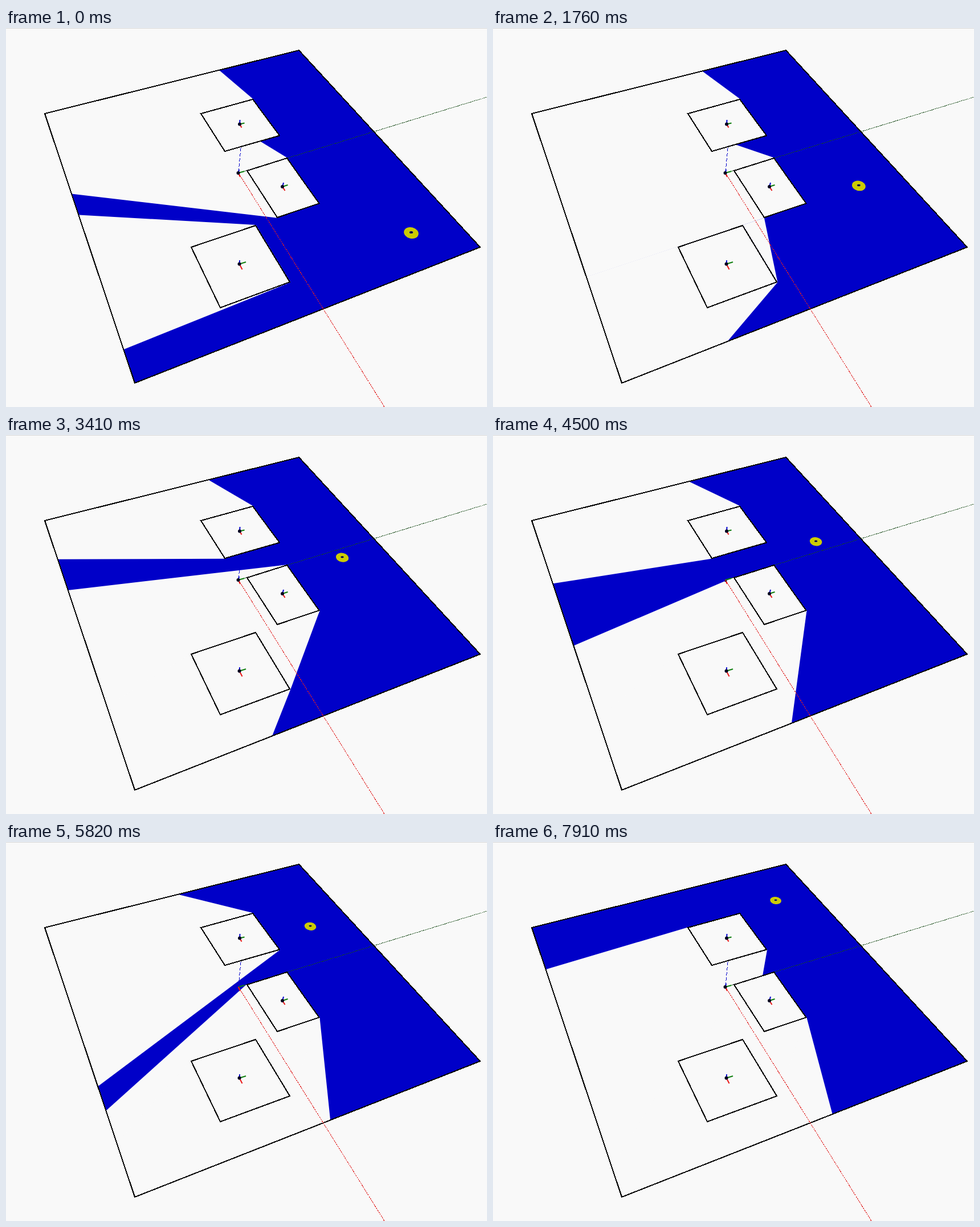
Recreate the animation shown at these times as an HTML page. Size 844 by 664 pixels, loop 8 s.

```html
<!DOCTYPE html>
<html lang="en">
<head>
<meta charset="utf-8">
<title>Visibility region of a moving light</title>
<style>
  html, body { margin: 0; width: 100%; height: 100%; overflow: hidden; background: #f9f9f9; }
  svg { display: block; width: 844px; height: 664px; }
  .edge { stroke: #000; stroke-width: 2; }
  .edge, .axis { shape-rendering: crispEdges; }
  .paper { fill: #f9f9f9; }
</style>
</head>
<body>
<svg viewBox="0 0 844 664">
  <defs>
    <clipPath id="floorClip"><polygon class="floor"/></clipPath>
    <clipPath id="shadeClip"></clipPath>
  </defs>
  <rect width="844" height="1" fill="#d8d8d8"/>
  <polygon class="floor" fill="#0000c8"/>
  <g id="shade" class="paper" clip-path="url(#floorClip)"></g>
  <polygon class="floor edge" fill="none"/>
  <g fill="none">
    <path class="axis" d="M408 254L844 121" stroke="#184a18" stroke-dasharray="2 1"/>
    <path class="axis" d="M408 254L664 664" stroke="#e02020" stroke-dasharray="3 1"/>
    <path class="axis" d="M408 252L412.5 206" stroke="#0000c8" stroke-dasharray="6 3"/>
  </g>
  <g id="boxes"></g>
  <g id="gizmos"></g>
  <g id="lamp">
    <ellipse rx="13" ry="9.8" fill="#cccc00" transform="rotate(14)"/>
    <ellipse cy="-1" rx="3.2" ry="2" fill="#0000c8"/>
    <ellipse cy="-1" rx="2.6" ry="1.5" fill="#000018"/>
  </g>
</svg>
<script>
const LOOP = 8000, TICK = 110;
const floor = [[68, 150], [514, 39], [832, 384], [226, 622]];
const boxes = [
  [[342, 150], [433, 125], [480, 188.5], [384, 216]],
  [[423, 250], [493, 228], [549.5, 307.3], [476, 332]],
  [[325, 384], [438, 346], [498, 445], [376, 490]]
];
// Key points of the lamp's path: time, x
const path = [
  [220, 711], [440, 688], [1760, 641.8], [2200, 621], [3410, 590], [4290, 570.5],
  [4400, 570.5], [5060, 547], [5830, 534], [6930, 508.5], [7920, 496]
];

const $ = id => document.getElementById(id);
const points = list => list.map(p => p.join()).join(' ');

function add(parent, tag, attrs = {}) {
  const el = document.createElementNS('http://www.w3.org/2000/svg', tag);
  for (const key in attrs) el.setAttribute(key, attrs[key]);
  return parent.appendChild(el);
}

function gizmo(x, y, up, right, down) {
  const g = add($('gizmos'), 'g', { transform: `translate(${x} ${y})`, 'stroke-width': 2 });
  add(g, 'path', { d: `M0 0L${right}`, stroke: '#108010' });
  add(g, 'path', { d: `M0 0L${down}`, stroke: '#e81818' });
  const ball = add(g, 'g');
  add(ball, 'path', { d: `M0 0L${up}`, stroke: '#0000d0' });
  add(ball, 'circle', { r: 3, fill: '#000020' });
  return ball;
}

// Obstacles cast shadows from slightly outside their outline
function grow(box) {
  const mid = [0, 1].map(i => box.reduce((sum, p) => sum + p[i], 0) / box.length);
  return box.map(p => p.map((v, i) => mid[i] + (v - mid[i]) * 1.015));
}

const casters = boxes.map(grow);
const front = casters[2];

document.querySelectorAll('.floor').forEach(el => el.setAttribute('points', points(floor)));
boxes.forEach(b => add($('boxes'), 'polygon', { class: 'paper edge', points: points(b) }));
gizmo(410, 168.5, '0.5 -7.5', '8.5 -2', '3.5 6');
gizmo(485, 278, '2 -7', '9.5 -3', '4.5 7');
gizmo(409.5, 413.5, '0.5 -6.5', '11.5 -3.5', '5 9.5');
// The ball at the origin disappears beneath the lit region
gizmo(407.5, 254, '1.5 -6', '11 -3', '3.5 7').setAttribute('clip-path', 'url(#shadeClip)');

// One shadow per box and one for the gap between two of them
const layers = [...boxes, null].map(() => [
  add($('shade'), 'polygon'),
  add($('shadeClip'), 'polygon', { transform: 'translate(-407.5 -254)' })
]);

// The lamp moves in ticks along straight stretches between the key points
function lampX(time) {
  const t = Math.floor((time + 15) / TICK) * TICK;
  const i = path.findIndex(p => p[0] >= t);
  if (i === 0) return path[0][1];
  const [[t0, x0], [t1, x1]] = [path[i - 1], path[i]];
  return x0 + (x1 - x0) * (t - t0) / (t1 - t0);
}

// Positive when b lies clockwise of a, seen from the light
const turn = (light, a, b) =>
  (a[0] - light[0]) * (b[1] - light[1]) - (a[1] - light[1]) * (b[0] - light[0]);

// Region behind the two outermost corners seen from the light
function shadow(box, light) {
  const a = box.reduce((m, p) => turn(light, m, p) < 0 ? p : m);
  const b = box.reduce((m, p) => turn(light, m, p) > 0 ? p : m);
  const far = p => p.map((v, i) => light[i] + (v - light[i]) * 40);
  return [a, far(a), far(b), b];
}

function draw(t) {
  const x = lampX(t);
  const y = 102.5 + 1.193 * (x - 496);
  const light = [x, y + 1.3];
  const polys = casters.map(b => shadow(b, light));
  // Once the front box's near corner is hidden, the gap before it stays unlit
  const corner = polys[1][0];
  const hidden = turn(light, corner, front[1]) > 0;
  polys.push(hidden ? [corner, front[1], front[2]] : []);
  polys.forEach((poly, i) =>
    layers[i].forEach(el => el.setAttribute('points', points(poly))));
  const k = (x - 496) / 215;
  $('lamp').setAttribute('transform',
    `translate(${x} ${y}) scale(${0.77 + 0.23 * k} ${0.65 + 0.35 * k})`);
}

function tick() {
  draw(performance.now() % LOOP);
  requestAnimationFrame(tick);
}
tick();
</script>
</body>
</html>
```
